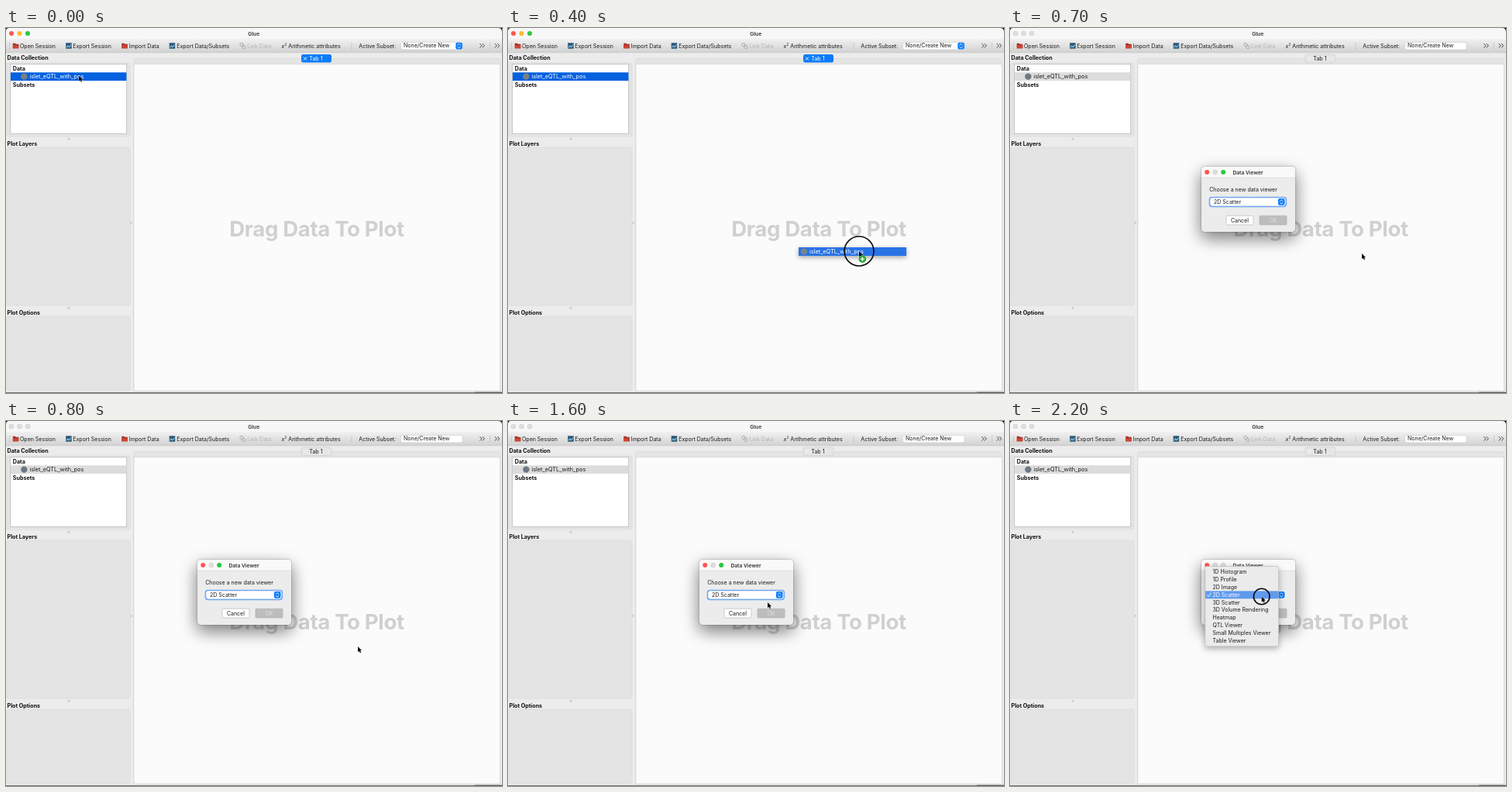
Write an HTML page that moves like this. It is 640 px wide and 471 px high and loops after 2.3 s.

```html
<!DOCTYPE html>
<html lang="en">
<head>
<meta charset="utf-8">
<title>Glue</title>
<style>
  html, body { margin: 0; width: 100%; height: 100%; overflow: hidden; background: #ececec; }
  svg { display: block; width: 640px; height: 471px; font: 7.03px Inter, "Open Sans", sans-serif; }
  text { fill: #1c1c1c; white-space: pre; }
  .bold { font-weight: 700; font-size: 7.15px; fill: #111; }
  .title { font-weight: 600; font-size: 6.7px; fill: #333; text-anchor: middle; }
  .mid { text-anchor: middle; }
  .item { font-size: 7.3px; }
  .white { fill: #fff; }
  .dim { fill: #b4b4b4; }
  .hint { font-size: 27.6px; font-weight: 700; letter-spacing: -.35px; fill: #d0d0d0; text-anchor: middle; }
  .line { fill: none; stroke: #333; stroke-width: .9; stroke-linecap: round; stroke-linejoin: round; }
  .panel { fill: #e4e4e4; stroke: #dcdcdc; stroke-width: .8; }
  .off { fill: #dedede; stroke: #cbcbcb; stroke-width: .6; }

  .row { fill: #0461e0; }
  .rowText, .tabText { fill: #fff; }
  .rowDot { fill: #7c7f82; }
  .tab, .knob { fill: #0a7cfb; }
  .tabX, .arrows { stroke: #fff; }
  .blur .row { fill: #dcdcdc; }
  .blur .rowText, .blur .tabText { fill: #1c1c1c; }
  .blur .rowDot { fill: #6c7884; }
  .blur .tab { fill: #e6e6e6; stroke: #cfcfcf; stroke-width: .7; }
  .blur .tabX { stroke: #f8f8f8; }
  .blur .popup .knob { fill: none; }
  .blur .popup .arrows { stroke: #222; }

  .dialog { filter: drop-shadow(0 8px 11px rgba(0, 0, 0, .42)) drop-shadow(0 0 1px rgba(0, 0, 0, .35)); }
  .menu { filter: drop-shadow(0 3px 4px rgba(0, 0, 0, .3)); }
  .drag { filter: drop-shadow(0 2px 3px rgba(0, 0, 0, .35)); }
</style>
</head>
<body>
<svg id="stage" viewBox="0 0 640 471">
  <defs>
    <linearGradient id="bar" x2="0" y2="1">
      <stop stop-color="#f1f1f1"/><stop offset="1" stop-color="#d2d2d2"/>
    </linearGradient>
    <g id="folder">
      <path d="M0 1H3L4 2H7.5V7.5H0Z" fill="#a82e22"/>
      <path d="M0 3.4H7.5V7.5H0Z" fill="#cb4534"/>
    </g>
    <g id="disk">
      <path d="M0 0H7.5V7.5H0Z" fill="#2b5878"/>
      <path d="M.8 4.8L2.6 3L4.2 4.6L6.7 1.8V3.6L4.2 6.2L2.6 4.7L.8 6.5Z" fill="#8fc3df"/>
    </g>
    <path id="updown" class="line arrows" d="M-1.7-1.1L0-2.8L1.7-1.1M-1.7 1.1L0 2.8L1.7 1.1"/>
    <path id="more" class="line" d="M0 0L2.4 2.4L0 4.8M3.4 0L5.8 2.4L3.4 4.8"/>
    <path id="grip" d="M0 0V7" stroke="#999" stroke-width="1" stroke-dasharray="1 2"/>
  </defs>

  <rect width="640" height="471" fill="#ececec"/>
  <rect width="640" height="14" fill="#f7f7f7"/>
  <rect y="14" width="640" height="17.5" fill="url(#bar)"/>
  <path d="M0 31.7H640" stroke="#c2c2c2" stroke-width=".7"/>
  <path d="M635 0H640V5Q640 0 635 0ZM0 0H4Q0 0 0 4Z" fill="#111"/>
  <text class="title" x="319.7" y="9.5">Glue</text>
  <g id="lights"></g>

  <use href="#grip" x="4.5" y="19.5"/><use href="#grip" x="446" y="19.5"/><use href="#grip" x="624.5" y="19.5"/>
  <use href="#folder" x="8.8" y="18.8"/><use href="#disk" x="77.2" y="19.2"/>
  <use href="#folder" x="149.3" y="18.8"/><use href="#disk" x="210.7" y="19.2"/>
  <g fill="none" stroke="#b0b0b0" stroke-width="1">
    <rect x="301.8" y="19.6" width="4.6" height="3.8" rx="1.9" transform="rotate(35 304 21.5)"/>
    <rect x="304.4" y="22.4" width="4.6" height="3.8" rx="1.9" transform="rotate(35 306.7 24.3)"/>
  </g>
  <text x="355.5" y="25.8" font-style="italic">x</text>
  <text x="359.6" y="22.6" style="font-size:4.4px">2</text>
  <g id="tools"></g>
  <use href="#more" x="611.6" y="20.4"/><use href="#more" x="631" y="20.4"/>

  <g class="popup">
    <rect x="509.3" y="18.3" width="79.8" height="9.6" rx="2.4" fill="#fff" stroke="#c4c4c4" stroke-width=".6"/>
    <text x="513" y="25.4">None/Create New</text>
    <rect class="knob" x="580.3" y="18.7" width="8.5" height="8.8" rx="2.2"/>
    <use href="#updown" x="584.6" y="23.1"/>
  </g>

  <text class="bold" x="1.5" y="41.2">Data Collection</text>
  <rect class="panel" x="1" y="45" width="159" height="95" rx="2"/>
  <rect x="5.7" y="46.8" width="150" height="89.5" fill="#fff" stroke="#b9b9b9" stroke-width=".8"/>
  <text class="bold" x="8.8" y="55">Data</text>
  <rect class="row" x="6" y="57.3" width="149.4" height="10.7"/>
  <circle class="rowDot" cx="23.4" cy="62.6" r="4.2"/>
  <text class="item rowText" x="30.4" y="65.3">islet_eQTL_with_pos</text>
  <text class="bold" x="8.8" y="75.8">Subsets</text>

  <text class="bold" x="1.5" y="152">Plot Layers</text>
  <rect class="panel" x="1" y="154" width="159" height="204" rx="2"/>
  <text class="bold" x="1.5" y="370">Plot Options</text>
  <rect class="panel" x="1" y="372" width="159" height="96" rx="2"/>
  <g fill="#d6d6d6" stroke="#bcbcbc" stroke-width=".5">
    <circle cx="81" cy="143.3" r="1.2"/><circle cx="81" cy="361.3" r="1.2"/><circle cx="161.7" cy="251.5" r="1.2"/>
  </g>

  <rect class="panel" x="164.5" y="39.5" width="473" height="429" rx="2"/>
  <rect x="165" y="46.8" width="472.3" height="421.4" fill="#fbfbfb" stroke="#cfcfcf" stroke-width=".6"/>
  <rect class="tab" x="381" y="34" width="39" height="10.6" rx="2.5"/>
  <path class="line tabX" d="M384.3 37.8L387.7 41.2M387.7 37.8L384.3 41.2"/>
  <text class="tabText" x="391.2" y="42" style="font-size:7.2px">Tab 1</text>
  <text class="hint" x="401" y="268.6">Drag Data To Plot</text>
  <path d="M0 470.6H640M605 470.2H640" stroke="#444" stroke-width=".8"/>

  <g id="dialog">
    <g class="dialog">
      <rect x="247" y="179" width="121" height="84" rx="4.5" fill="#ececec"/>
      <path d="M247 193V183.5Q247 179 251.5 179H363.5Q368 179 368 183.5V193Z" fill="#f9f9f9"/>
    </g>
    <path d="M247 193.2H368" stroke="#d6d6d6" stroke-width=".6"/>
    <g id="dialogLights"></g>
    <text class="title" x="307" y="188.5">Data Viewer</text>
    <text x="257.2" y="211.2">Choose a new data viewer</text>
    <rect id="focus" x="257.6" y="218.6" width="98.6" height="11.6" rx="3" fill="none" stroke="#74a9f2" stroke-width="1.9"/>
    <rect x="258.4" y="219.4" width="97" height="10" rx="2.3" fill="#fff"/>
    <text x="263" y="227">2D Scatter</text>
    <rect class="knob" x="345.9" y="220" width="8.6" height="8.8" rx="2.2"/>
    <use href="#updown" x="350.2" y="224.4" style="stroke:#fff"/>
    <rect x="279" y="242.2" width="35" height="11.8" rx="1" fill="#fdfdfd" stroke="#bcbcbc" stroke-width=".7"/>
    <text class="mid" x="296.4" y="250.7">Cancel</text>
    <rect x="322" y="242.2" width="35" height="11.8" rx="1" fill="#bdbdbd" stroke="#adadad" stroke-width=".6"/>
    <text class="mid" x="339.5" y="250.7" style="fill:#dedede">OK</text>
  </g>

  <g id="menu">
    <rect class="menu" x="251.8" y="187.6" width="94.8" height="103.2" rx="2" fill="#ebebeb" stroke="#b4b4b4" stroke-width=".6"/>
    <rect x="252.1" y="219.4" width="94.2" height="9.9" fill="#5f9aee"/>
    <path class="line" d="M254.6 224.9L256.2 226.8L259 221.9" style="stroke:#fff"/>
    <g id="choices"></g>
  </g>

  <g id="drag">
    <rect class="drag" width="139" height="11" fill="#2773e6"/>
    <circle cx="7" cy="5.5" r="4.2" fill="#76828e"/>
    <text class="item white" x="14" y="8.2">islet_eQTL_with_pos</text>
  </g>
  <circle id="ring" fill="none" stroke="#0a0a0a" stroke-width="1.6"/>
  <g id="cursor">
    <path d="M0 0V7.2L1.7 5.7L2.9 8.3L4.1 7.8L2.9 5.3H5.1Z" fill="#000" stroke="#fff" stroke-width=".7" paint-order="stroke"/>
    <g id="plus">
      <circle cx="4.3" cy="10.2" r="4.8" fill="#27a52c"/>
      <path d="M1.6 10.2H7M4.3 7.5V12.9" stroke="#fff" stroke-width="1.3"/>
    </g>
  </g>
</svg>
<script>
const LOOP = 2300, STEP = 100;
const $ = id => document.getElementById(id);
const show = (id, on) => $(id).style.display = on ? '' : 'none';
const move = (id, [x, y]) => $(id).setAttribute('transform', `translate(${x} ${y})`);
const text = (x, y, s, cls = '') => `<text class="${cls}" x="${x}" y="${y}">${s}</text>`;

$('tools').innerHTML = [
  [18, 'Open Session'], [86.3, 'Export Session'], [158.8, 'Import Data'],
  [220.2, 'Export Data/Subsets'], [311.2, 'Link Data', 'dim'],
  [364.3, 'Arithmetic attributes'], [455.3, 'Active Subset:']
].map(([x, s, cls]) => text(x, 25.6, s, cls)).join('');

$('choices').innerHTML = [
  '1D Histogram', '1D Profile', '2D Image', '2D Scatter', '3D Scatter', '3D Volume Rendering',
  'Heatmap', 'QTL Viewer', 'Small Multiples Viewer', 'Table Viewer'
].map((s, i) => text(261.5, 197.1 + i * 9.85, s, i === 3 ? 'white' : '')).join('');

// An empty colour gives a grey, disabled light.
const lights = (id, x, y, colours) => {
  $(id).innerHTML = colours.map((c, i) =>
    `<circle cx="${x + i * 10.5}" cy="${y}" r="3" ${c ? `fill="${c}"` : 'class="off"'}/>`).join('');
};

const RED = '#fe5650', YELLOW = '#fdbb2e', GREEN = '#29c840';
const GRAB = [94, 61.5], DROP = [454, 291], OVER_OK = [335, 234], PICK = [324.7, 226.5];
const mix = (a, b, k) => a.map((v, i) => v + (b[i] - v) * k);
const clamp = v => Math.max(0, Math.min(1, v));
const ease = k => k * k * (3 - 2 * k);

const dragPath = [GRAB, [111, 71], [165, 102], [345, 222], [453, 288]];
const dragImage = { 2: [58.5, 82.5], 3: [267, 217], 4: [375, 283], 5: [375, 283] };
const ringSize = { 1: 9, 2: 10, 3: 10, 4: 19, 5: 24, 21: 9, 22: 10.3 };

function pointer(n) {
  if (n < 5) return dragPath[n];
  if (n < 19) return mix(DROP, OVER_OK, ease(clamp((n - 9) / 6)));
  return mix(OVER_OK, PICK, ease(clamp((n - 18) / 3)));
}

function draw(n) {
  const at = pointer(n), image = dragImage[n], r = ringSize[n], open = n >= 22;
  move('cursor', at);
  show('plus', n === 3 || n === 4);

  show('drag', image);
  if (image) move('drag', image);
  $('drag').style.opacity = n === 5 ? .25 : 1;

  show('ring', r);
  if (r) {
    move('ring', at);
    $('ring').setAttribute('r', r);
    $('ring').style.opacity = n === 5 ? .35 : 1;
  }

  lights('lights', 7, 7, n < 6 ? [RED, YELLOW, GREEN] : ['', '', '']);
  $('stage').classList.toggle('blur', n >= 7);
  show('dialog', n >= 7);
  lights('dialogLights', 254.2, 186, open ? [RED, '', ''] : [RED, '', GREEN]);
  show('focus', !open);
  show('menu', open);
}

const start = performance.now();
let last = -1;
function tick() {
  const n = Math.floor(((performance.now() - start) % LOOP) / STEP);
  if (n !== last) draw(last = n);
  requestAnimationFrame(tick);
}
tick();
</script>
</body>
</html>
```
